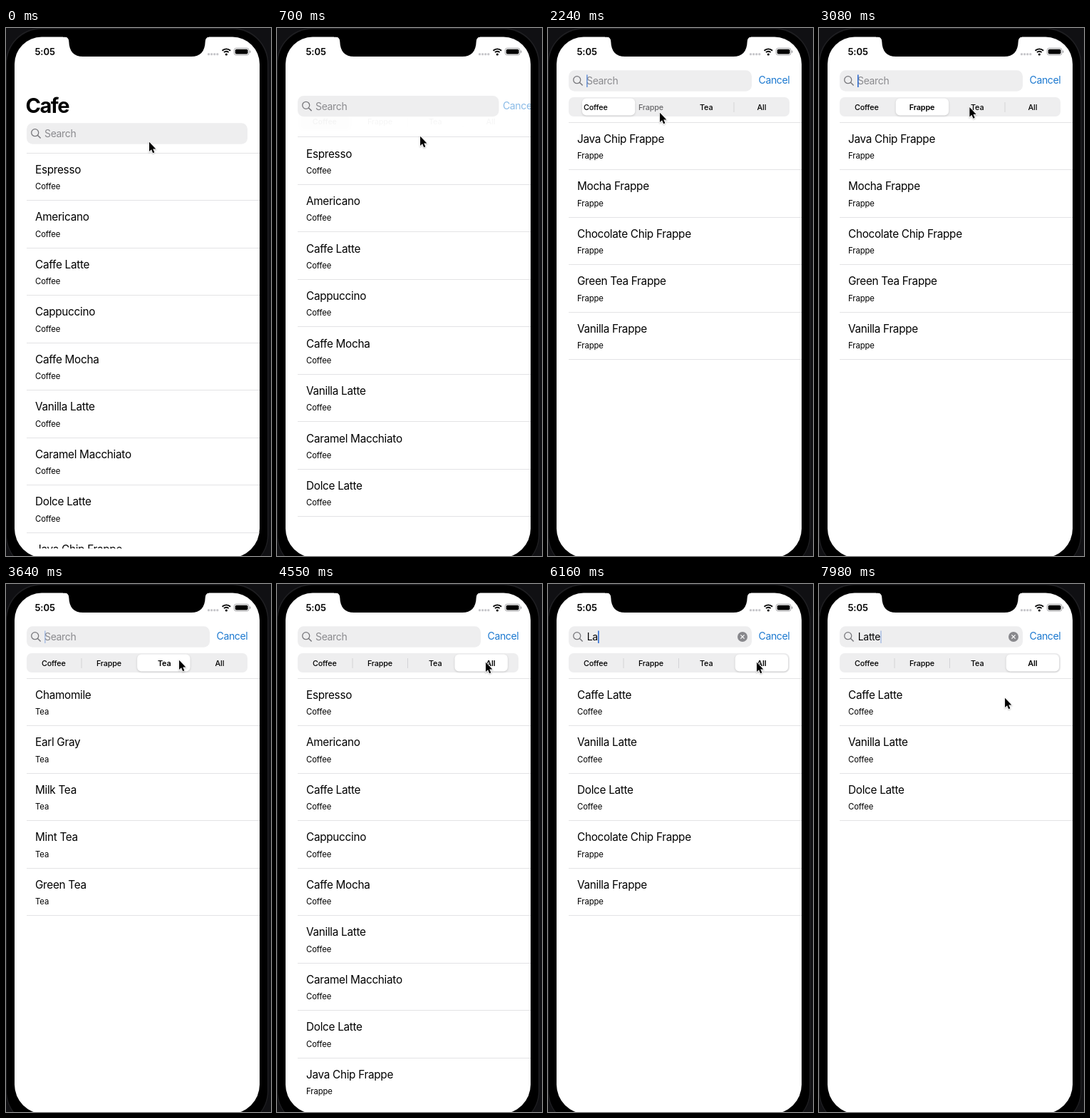
Recreate the animation shown at these times as an HTML page with a canvas. Size 372 px wide and 740 px high, loop 8000 ms.

```html
<!DOCTYPE html>
<html lang="en">
<head>
<meta charset="utf-8">
<title>Cafe menu search</title>
<style>
  html, body { margin: 0; width: 372px; height: 740px; overflow: hidden; background: #000; }
  canvas { display: block; }
</style>
</head>
<body>
<canvas id="stage" width="372" height="740"></canvas>
<script>
const ctx = document.getElementById('stage').getContext('2d');
const LOOP = 8000, STEP = 70, ROW = 66.5;
const GRAY = '#8a8a8e', FIELD = '#eeeeef';

const scopes = ['Coffee', 'Frappe', 'Tea', 'All'];
const menu = {
  Coffee: ['Espresso', 'Americano', 'Caffe Latte', 'Cappuccino', 'Caffe Mocha',
    'Vanilla Latte', 'Caramel Macchiato', 'Dolce Latte'],
  Frappe: ['Java Chip Frappe', 'Mocha Frappe', 'Chocolate Chip Frappe', 'Green Tea Frappe', 'Vanilla Frappe'],
  Tea: ['Chamomile', 'Earl Gray', 'Milk Tea', 'Mint Tea', 'Green Tea']
};
const items = Object.entries(menu).flatMap(([kind, names]) => names.map(name => ({ name, kind })));

// Script of the session, all times in ms
const openStart = 490, openEnd = 900;
const taps = [
  { press: -999, start: -999 },
  { press: 2030, start: 2190 },
  { press: 3150, start: 3290 },
  { press: 4270, start: 4372 }
];
const keys = [[560, ''], [5670, 'L'], [6160, 'La'], [6440, 'Lat'], [6790, 'Latt'], [7000, 'Latte']];
const pointer = [
  [0, 201, 159], [280, 201, 151], [1150, 201, 151], [1540, 157, 118], [2960, 157, 118],
  [3150, 243, 106], [3640, 243, 106], [3780, 276, 109], [3920, 293, 109], [7560, 293, 109],
  [7770, 275, 143], [7910, 275, 143], [7980, 261, 159]
];

const clamp = v => Math.max(0, Math.min(1, v));
const mix = (a, b, p) => a + (b - a) * p;
const smooth = p => p * p * (3 - 2 * p);
const spring = ms => { const x = Math.max(0, ms) * 0.018; return 1 - (1 + x) * Math.exp(-x); };

function box(x, y, w, h, r, fill) {
  ctx.beginPath();
  ctx.roundRect(x, y, w, h, r);
  ctx.fillStyle = fill;
  ctx.fill();
}

function line(color, width, ...points) {
  ctx.beginPath();
  points.forEach(([x, y], i) => i ? ctx.lineTo(x, y) : ctx.moveTo(x, y));
  ctx.strokeStyle = color;
  ctx.lineWidth = width;
  ctx.stroke();
}

function disc(x, y, r, fill) {
  ctx.beginPath();
  ctx.arc(x, y, r, 0, 7);
  ctx.fillStyle = fill;
  ctx.fill();
}

function text(str, x, y, size, { weight = 400, color = '#000', spacing = -0.35, align = 'left' } = {}) {
  ctx.font = `${weight} ${size}px Inter, "Liberation Sans", sans-serif`;
  ctx.letterSpacing = spacing + 'px';
  ctx.textAlign = align;
  ctx.fillStyle = color;
  ctx.fillText(str, x, y);
  return ctx.measureText(str).width;
}

function drawList(rows, top) {
  ctx.save();
  ctx.beginPath();
  ctx.rect(12, 0, 344, 729.5);
  ctx.clip();
  for (let i = 0; i <= rows.length; i++) {
    const y = top + i * ROW;
    ctx.fillStyle = '#e3e3e5';
    ctx.fillRect(29, Math.floor(y), 327, 1);
    if (i === rows.length) break;
    text(rows[i].name, 41, y + 28.8, 15.3, { spacing: -0.29 });
    text(rows[i].kind, 41, y + 51, 11.3, { spacing: -0.1 });
  }
  ctx.restore();
}

function caretAlpha(age) {
  if (age < 560) return 1;
  const q = (age - 560) % 1050;
  return clamp(Math.max(1 - q / 210, (q - 350) / 210));
}

function drawSearch(open, query, keyAge) {
  const y = mix(133.3, 59.3, open), mid = y + 14.7;
  const right = mix(339, 286, open);
  box(29, y, right - 29, 29.4, 8.5, FIELD);

  ctx.beginPath();
  ctx.arc(40.7, mid - 1.3, 5, 0, 7);
  ctx.strokeStyle = '#77777b';
  ctx.lineWidth = 1.3;
  ctx.stroke();
  line('#77777b', 1.5, [44.3, mid + 2.3], [48.6, mid + 6.5]);

  let caretX = 54;
  if (query) {
    caretX = 55 + text(query, 54.8, mid + 5.2, 14);
    disc(273, 74, 7, '#88888c');
    line('#fff', 1.2, [270.4, 71.4], [275.6, 76.6]);
    line('#fff', 1.2, [275.6, 71.4], [270.4, 76.6]);
  } else {
    text('Search', 54, mid + 5.2, 14, { color: GRAY });
  }
  if (open > 0.9) {
    ctx.globalAlpha = caretAlpha(keyAge);
    ctx.fillStyle = '#2f6bd0';
    ctx.fillRect(caretX, 65.5, 1.6, 17.5);
  }
  ctx.globalAlpha = open;
  text('Cancel', mix(340, 295.5, open), mid + 4.1, 14, { color: '#1c79d0' });
  ctx.globalAlpha = 1;
}

function drawScopes(t, selected, open) {
  ctx.globalAlpha = clamp(open * 2 - 1);
  const top = mix(140, 97, open);
  box(29, top, 310, 27, 7, FIELD);
  ctx.fillStyle = '#d3d3d6';
  for (let i = 0; i < 3; i++)
    if (i !== selected && i + 1 !== selected) ctx.fillRect(105.5 + i * 77.5, top + 7, 1, 14);

  const slide = taps.slice(1).reduce((sum, tap) => sum + spring(t - tap.start), 0);
  ctx.save();
  ctx.shadowColor = 'rgba(0,0,0,.17)';
  ctx.shadowBlur = 3;
  ctx.shadowOffsetY = 1;
  box(30.2 + slide * 77.5, top + 1.6, 74.4, 23.8, 6, '#fff');
  ctx.restore();

  scopes.forEach((name, i) => {
    const held = t >= taps[i].press && t < taps[i].start + 120;
    text(name, 66.8 + i * 77.7, top + 17.7, 10.8, {
      weight: i === selected && !held ? 600 : 500,
      color: held ? '#67676a' : '#000', spacing: -0.15, align: 'center'
    });
  });
  ctx.globalAlpha = 1;
}

function drawStatus() {
  text('5:05', 40.5, 38, 13, { weight: 600, spacing: -0.1 });
  for (let i = 0; i < 4; i++) box(283 + i * 4.1, 35.3, 3, 3, 0.8, '#c6c6ca');
  disc(309.3, 37, 1.6, '#000');
  ctx.strokeStyle = '#000';
  ctx.lineWidth = 1.9;
  for (const r of [4.7, 8.1]) {
    ctx.beginPath();
    ctx.arc(309.3, 37.5, r, -Math.PI * 0.75, -Math.PI * 0.25);
    ctx.stroke();
  }
  ctx.beginPath();
  ctx.roundRect(320.2, 28.2, 20.8, 9.8, 3);
  ctx.strokeStyle = '#a0a0a3';
  ctx.lineWidth = 0.9;
  ctx.stroke();
  box(321.7, 29.7, 17.8, 6.8, 1.7, '#000');
  box(342, 31.4, 1.3, 3.4, 0.6, '#a0a0a3');
}

function drawNotch() {
  ctx.fillStyle = '#000';
  ctx.fill(new Path2D('M80 11V12.5H83Q88 13 88.3 19Q89 40 108 40H260Q279 40 279.700 19Q280 13 285 12.500V11Z'));
}

function drawPointer(t) {
  const n = pointer.findIndex(p => p[0] > t);
  const b = pointer[n < 0 ? pointer.length - 1 : n];
  const a = n < 0 ? b : pointer[n - 1];
  const p = a === b ? 0 : (t - a[0]) / (b[0] - a[0]);
  ctx.save();
  ctx.translate(mix(a[1], b[1], p) - 0.4, mix(a[2], b[2], p) + 0.7);
  ctx.scale(0.94, 0.94);
  const arrow = new Path2D('M0.500 0V14.200L3.700 11.300L6 16.600L8.300 15.600L6 10.500H10.400Z');
  ctx.shadowColor = 'rgba(0,0,0,.25)';
  ctx.shadowBlur = 2;
  ctx.shadowOffsetY = 1;
  ctx.strokeStyle = '#fff';
  ctx.lineWidth = 1.6;
  ctx.stroke(arrow);
  ctx.shadowColor = 'transparent';
  ctx.fillStyle = '#000';
  ctx.fill(arrow);
  ctx.restore();
}

function draw(t) {
  const open = smooth(clamp((t - openStart) / (openEnd - openStart)));
  const [keyTime, query] = keys.findLast(k => k[0] <= t) || keys[0];
  const selected = taps.findLastIndex(tap => tap.start <= t);
  const scope = t > openStart ? scopes[selected] : 'All';
  const rows = items.filter(item => (scope === 'All' || item.kind === scope) &&
    item.name.toLowerCase().includes(query.toLowerCase()));

  ctx.fillStyle = '#101013';
  ctx.fillRect(0, 0, 372, 740);
  box(-0.5, 0, 369, 760, 50, '#1f1f22');
  box(1, 1.5, 366, 758, 49, '#000');

  ctx.save();
  ctx.beginPath();
  ctx.roundRect(12, 12.5, 344, 730, [38, 38, 41, 41]);
  ctx.clip();
  ctx.fillStyle = '#fff';
  ctx.fillRect(0, 0, 372, 740);
  drawList(rows, mix(175, 132, open));
  if (open < 1) {
    ctx.globalAlpha = clamp(1 - open * 2);
    text('Cafe', 27.5, mix(119.4, 76, open), 29, { weight: 700, spacing: -1.5 });
    ctx.globalAlpha = 1;
  }
  if (open > 0) drawScopes(t, selected, open);
  drawSearch(open, query, t - keyTime);
  drawStatus();
  ctx.restore();
  drawNotch();
  drawPointer(t);
}

function tick() {
  const now = performance.now() % LOOP;
  draw(Math.floor(now / STEP) * STEP);
  requestAnimationFrame(tick);
}
tick();
</script>
</body>
</html>
```
